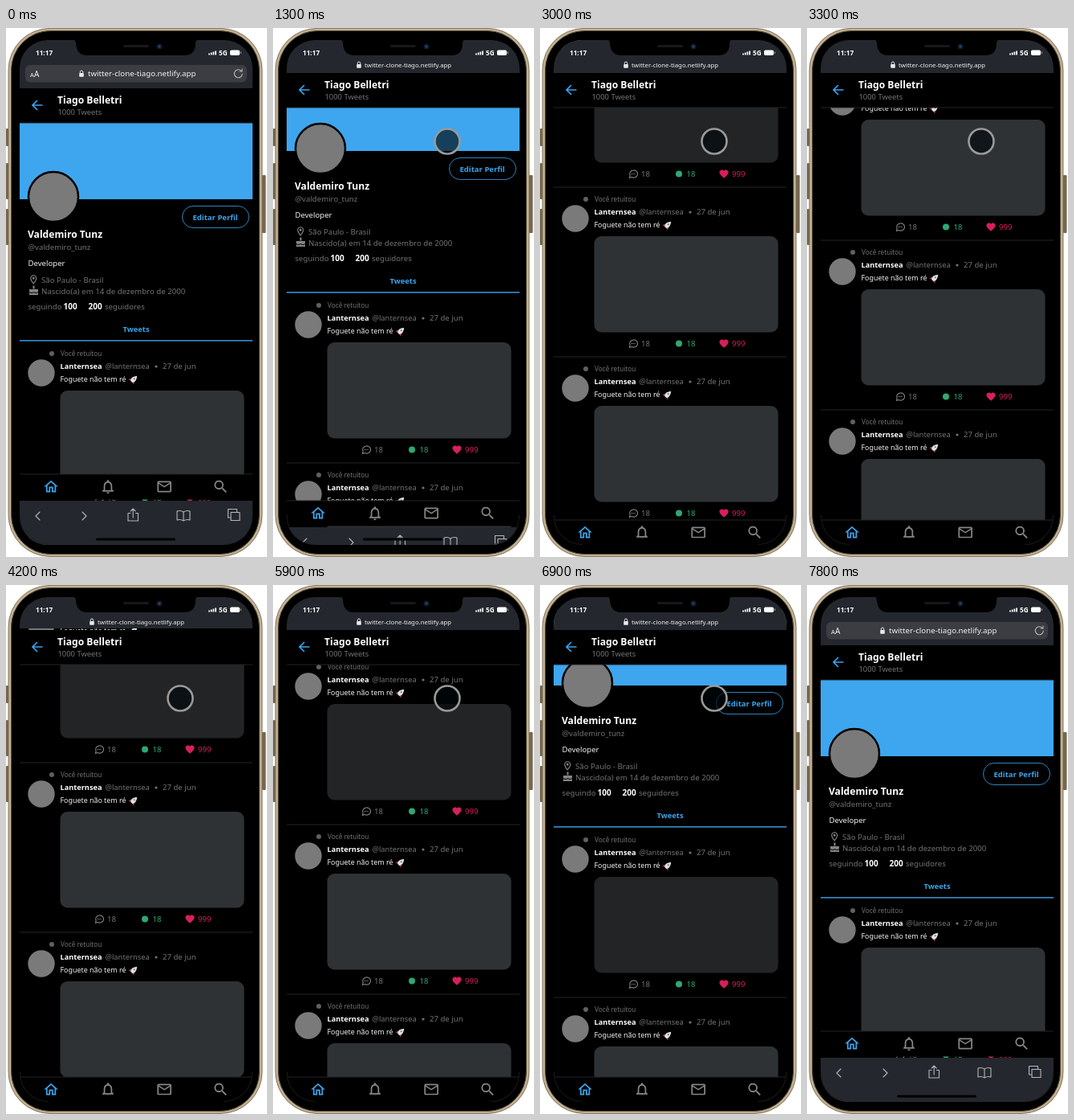
An HTML page for the animation above (9 s loop, 325 by 658 pixels).

```html
<!DOCTYPE html>
<html lang="pt-BR">
<head>
<meta charset="utf-8">
<title>Perfil</title>
<style>
html, body { margin: 0; width: 100%; height: 100%; overflow: hidden; background: #fff; }
svg { display: block; width: 325px; height: 658px; }
text { font: 9.6px "Noto Sans", "Open Sans", sans-serif; fill: #737373; }
.bold { font-weight: 700; fill: #fff; }
.title { font-size: 12.1px; }
.white { fill: #f2f2f2; }
.blue { fill: #3ba4ec; }
.green { fill: #2fa873; }
.pink { fill: #d81f5c; }
.gray { fill: #858585; }
.thin { fill: none; stroke: #b4b6b9; stroke-width: 1.1; stroke-linecap: round; stroke-linejoin: round; }
.tweet rect { fill: #2f3235; }
.tweet.pressed rect { fill: #222426; }
</style>
</head>
<body>
<svg viewBox="0 0 325 658">
  <defs>
    <clipPath id="screen"><rect x="17" y="15" width="290" height="628" rx="35"/></clipPath>
    <g id="lock">
      <rect x="-2.8" y="-1" width="5.6" height="4.8" rx=".8" fill="#e8e8e8"/>
      <path d="M-1.7-1V-2.3a1.7 1.7 0 0 1 3.4 0V-1" fill="none" stroke="#e8e8e8"/>
    </g>
    <g id="tweet">
      <circle cx="57" cy="405" r="3" fill="#606060"/>
      <text x="68" y="408" style="font-size:8.2px">Você retuitou</text>
      <circle cx="44" cy="429" r="16.7" fill="#7a7a7a"/>
      <text x="67.5" y="424" class="bold" style="font-size:9.2px">Lanternsea</text>
      <text x="123.5" y="424" style="font-size:9.4px">@lanternsea</text>
      <circle cx="187" cy="421" r="1.6" fill="#737373"/>
      <text x="195" y="424">27 de jun</text>
      <text x="67.5" y="440" class="white" style="font-size:8.9px">Foguete não tem ré</text>
      <g transform="translate(159 437) rotate(45)">
        <path d="M-2 0-4 3V5L0 3 4 5V3L2 0" fill="#a33f48"/>
        <path d="M0-6Q5 0 1.5 4h-3Q-5 0 0-6" fill="#dfe3e6"/>
        <circle cy="-1" r="1" fill="#557686"/>
      </g>
      <rect x="67.5" y="451" width="229" height="119.5" rx="9"/>
      <path d="M111.5 589.5l.6-3a5 4.6 0 1 1 2 2z" fill="none" stroke="#858585" stroke-width="1.1"/>
      <path d="M113.500 584.500h5" stroke="#858585" stroke-width="1.2" stroke-dasharray="1.2 .7"/>
      <text x="126" y="588">18</text>
      <circle cx="173" cy="584.5" r="4" class="green"/>
      <text x="182.5" y="588" class="green">18</text>
      <path transform="translate(222.3 577.7) scale(.56)" class="pink" d="M12 21.35l-1.45-1.32C5.4 15.36 2 12.28 2 8.5 2 5.42 4.42 3 7.5 3c1.74 0 3.41.81 4.5 2.09C13.09 3.81 14.76 3 16.5 3 19.58 3 22 5.42 22 8.5c0 3.78-3.4 6.86-8.55 11.54z"/>
      <text x="239" y="588" class="pink">999</text>
      <path d="M17 601H307" stroke="#222427"/>
    </g>
  </defs>

  <!-- phone body -->
  <g fill="#75684f">
    <rect x="0" y="125" width="3" height="22" rx="1"/>
    <rect x="0" y="168" width="3" height="45" rx="1"/>
    <rect x="0" y="225" width="3" height="45" rx="1"/>
    <rect x="319" y="183" width="4.500" height="72" rx="1"/>
  </g>
  <rect x="3" y=".4" width="316" height="657" rx="52" fill="#c3b192" stroke="#6b6049" stroke-width=".8"/>
  <rect x="6.5" y="3.500" width="309" height="651" rx="49" fill="#000" stroke="#5c523f"/>

  <g clip-path="url(#screen)">
    <g id="page">
      <rect x="17" y="118" width="290" height="95" fill="#3ea6ee"/>
      <circle cx="59" cy="210" r="31" fill="#7a7a7a" stroke="#000" stroke-width="2.5"/>
      <rect x="219.5" y="221.5" width="83" height="27" rx="13.5" fill="none" stroke="#2e83bd"/>
      <text x="232.5" y="239" class="bold blue" style="font-size:9.5px">Editar Perfil</text>
      <text x="27" y="261" class="bold title">Valdemiro Tunz</text>
      <text x="27.5" y="275.5">@valdemiro_tunz</text>
      <text x="27.5" y="296" class="white">Developer</text>
      <path transform="translate(27.300 306) scale(.58)" class="gray" d="M12 2C8.130 2 5 5.130 5 9c0 5.250 7 13 7 13s7-7.750 7-13c0-3.870-3.130-7-7-7zM7 9c0-2.760 2.240-5 5-5s5 2.240 5 5c0 2.880-2.880 7.190-5 9.880C9.920 16.210 7 11.850 7 9zM9.500 9a2.500 2.500 0 1 0 5 0 2.500 2.500 0 1 0-5 0"/>
      <text x="44" y="316.5">São Paulo - Brasil</text>
      <path d="M29 332v-3q2.700 2 5.500 0 2.700 2 5.500 0v3zM29 328v-3h11v3q-2.700 2-5.500 0-2.700 2-5.500 0M33.500 324.500v-4h2v4z" class="gray"/>
      <text x="44" y="330.5" style="font-size:9.7px">Nascido(a) em 14 de dezembro de 2000</text>
      <text x="27.5" y="350">seguindo</text>
      <text x="71.5" y="350" class="bold" style="font-size:10px">100</text>
      <text x="102.5" y="350" class="bold" style="font-size:10px">200</text>
      <text x="123" y="350">seguidores</text>
      <text x="145.5" y="378" class="bold blue" style="font-size:9.4px">Tweets</text>
      <rect x="17" y="388" width="290" height="1.7" fill="#3387c2"/>
    </g>

    <g id="header">
      <rect x="17" y="75" width="290" height="43" fill="#000"/>
      <path d="M17 118H307" stroke="#222427"/>
      <path d="M45.5 96H33M39 90l-6 6 6 6" fill="none" stroke="#3ba4ec" stroke-width="1.7"/>
      <text x="64" y="94" class="bold title">Tiago Belletri</text>
      <text x="64.5" y="108" style="font-size:9.4px">1000 Tweets</text>
    </g>

    <g id="nav">
      <rect x="17" y="555" width="290" height="31.5" fill="#000"/>
      <path d="M17 555H307" stroke="#222427"/>
      <path transform="translate(45.500 560) scale(.88)" class="blue" d="M12 5.690l5 4.500V18h-2v-6H9v6H7v-7.810l5-4.500M12 3L2 12h3v8h6v-6h2v6h6v-8h3z"/>
      <path transform="translate(116.400 560) scale(.88)" class="gray" d="M12 22c1.100 0 2-.9 2-2h-4c0 1.100.9 2 2 2zm6-6v-5c0-3.070-1.630-5.640-4.500-6.320V4a1.500 1.500 0 0 0-3 0v.68C7.640 5.360 6 7.920 6 11v5l-2 2v1h16v-1zm-2 1H8v-6c0-2.480 1.510-4.500 4-4.500s4 2.020 4 4.500z"/>
      <path transform="translate(186.600 560) scale(.88)" class="gray" d="M22 6c0-1.100-.9-2-2-2H4c-1.100 0-2 .9-2 2v12c0 1.100.9 2 2 2h16c1.100 0 2-.9 2-2zm-2 0l-8 5-8-5zm0 12H4V8l8 5 8-5z"/>
      <path transform="translate(256.800 560) scale(.88)" class="gray" d="M15.500 14h-.79l-.28-.27A6.500 6.500 0 1 0 13.730 14.430l.27.28v.79l5 4.990L20.490 19zm-6 0a4.500 4.500 0 1 1 0-9 4.500 4.500 0 0 1 0 9z"/>
    </g>

    <g id="toolbar">
      <rect x="17" y="588" width="290" height="60" fill="#24272d"/>
      <path class="thin" d="M42 602l-5 5 5 5M95 602l5 5-5 5M155 603.500h-3v9.500h12.500v-9.500h-3M158.200 609v-11m-3 3l3-3 3 3
        M221 602q-4-2.500-8-1v11q4-1.500 8 1 4-2.500 8-1v-11q-4-1.500-8 1v11M280 602.500h11v10h-11zM279 609h-2.500v-10.500h11v3"/>
    </g>
    <rect x="112" y="634.5" width="99" height="3" rx="1.5" fill="#000"/>

    <rect id="topbar" x="17" y="15" width="290" height="60" fill="#24272d"/>
    <g id="wideAddress">
      <rect x="24" y="46" width="276" height="21.5" rx="6" fill="#3b3d42"/>
      <text x="30" y="60.5" class="white" style="font-size:7.5px">A</text>
      <text x="35" y="60.5" class="white" style="font-size:10px">A</text>
      <use href="#lock" x="94" y="57"/>
      <text x="102" y="60" class="white" style="font-size:9.7px">twitter-clone-tiago.netlify.app</text>
      <path class="thin" d="M293.500 54a5 5 0 1 0 .8 3M291 54h3v-3"/>
    </g>
    <g id="smallAddress">
      <use href="#lock" x="107" y="46"/>
      <text x="114" y="48.5" class="white" style="font-size:7.8px">twitter-clone-tiago.netlify.app</text>
    </g>
    <text x="37" y="33.5" class="bold" style="font-size:8.2px">11:17</text>
    <path d="M253 33.500v-2M255.700 33.500v-3M258.400 33.500v-4M261.100 33.500v-5" stroke="#fff" stroke-width="1.7"/>
    <text x="265" y="33.5" class="bold" style="font-size:8.2px">5G</text>
    <rect x="279" y="27.5" width="12" height="6.5" rx="1.8" fill="#fff"/>
    <path d="M292.300 29.500v2.500" stroke="#aaa"/>
    <path d="M17.500 606v2a35 35 0 0 0 35 34.500M306.500 606v2a35 35 0 0 1-35 34.500" fill="none" stroke="#1d1e1f"/>
  </g>

  <!-- notch -->
  <path d="M83 14Q87 15 87 19 88 34 101 34H222Q236 34 236 19 236 15 240 14Z" fill="#000"/>
  <rect x="146" y="21" width="32" height="3" rx="1.5" fill="#17181b"/>
  <circle cx="191" cy="23" r="3.5" fill="#101b2b"/>
  <circle cx="191" cy="23" r="1.5" fill="#244a70"/>

  <circle id="touch" cx="217" cy="141" r="15.5" fill="#00080d" fill-opacity=".65" stroke="#999a98" stroke-width="2.6"/>
</svg>
<script>
const LOOP = 9000, STEP = 100, TWEETS = 5, PITCH = 211, FEED_TOP = 390, TOUCH_Y = 141;
const [page, header, nav, toolbar, topbar, wideAddress, smallAddress, touch, template] =
  ['page', 'header', 'nav', 'toolbar', 'topbar', 'wideAddress', 'smallAddress', 'touch', 'tweet']
    .map(id => document.getElementById(id));

const tweets = Array.from({ length: TWEETS }, (_, i) => {
  const tweet = template.cloneNode(true);
  tweet.removeAttribute('id');
  tweet.setAttribute('class', 'tweet');
  moveY(tweet, i * PITCH);
  return page.appendChild(tweet);
});

// start time, number of steps, scroll position reached
const swipes = [
  [1300, 4, 165], [2100, 5, 320], [3000, 4, 548],
  [4000, 3, 591], [5900, 5, 332], [6600, 7, 0]
];

// scroll position, and the tweet that lay under the finger when the swipe began
function scrollAt(t) {
  let scroll = 0, pressed = -1;
  for (const [start, steps, end] of swipes) {
    if (t < start) break;
    pressed = Math.floor((scroll + TOUCH_Y - FEED_TOP) / PITCH);
    const done = Math.min(1, (Math.floor((t - start) / STEP) + 1) / steps);
    scroll += (end - scroll) * (1 - (1 - done) ** 1.57);
  }
  return { scroll: Math.round(scroll), pressed };
}

function moveY(el, y) { el.setAttribute('transform', `translate(0 ${y})`); }
function show(el, on) { el.setAttribute('opacity', +on); }

function draw(now) {
  const t = now % LOOP;
  const compact = t >= 1300 && t < 7100;
  const sliding = compact && (t < 1400 || t >= 7000);
  const barShift = sliding ? 33 : compact ? 57 : 0;
  const resting = t >= 4200 && t < 5900;
  const touching = t >= 900 && t < 7800;
  const { scroll, pressed } = scrollAt(t);

  moveY(page, -scroll);
  tweets.forEach((tweet, i) => tweet.classList.toggle('pressed', touching && i === pressed));
  moveY(header, compact ? -19 : 0);
  moveY(nav, barShift);
  moveY(toolbar, barShift);
  topbar.setAttribute('height', resting ? 39 : compact ? 41 : 60);
  show(wideAddress, !compact);
  show(smallAddress, compact);
  show(touch, touching);
  requestAnimationFrame(draw);
}
requestAnimationFrame(draw);
</script>
</body>
</html>
```
